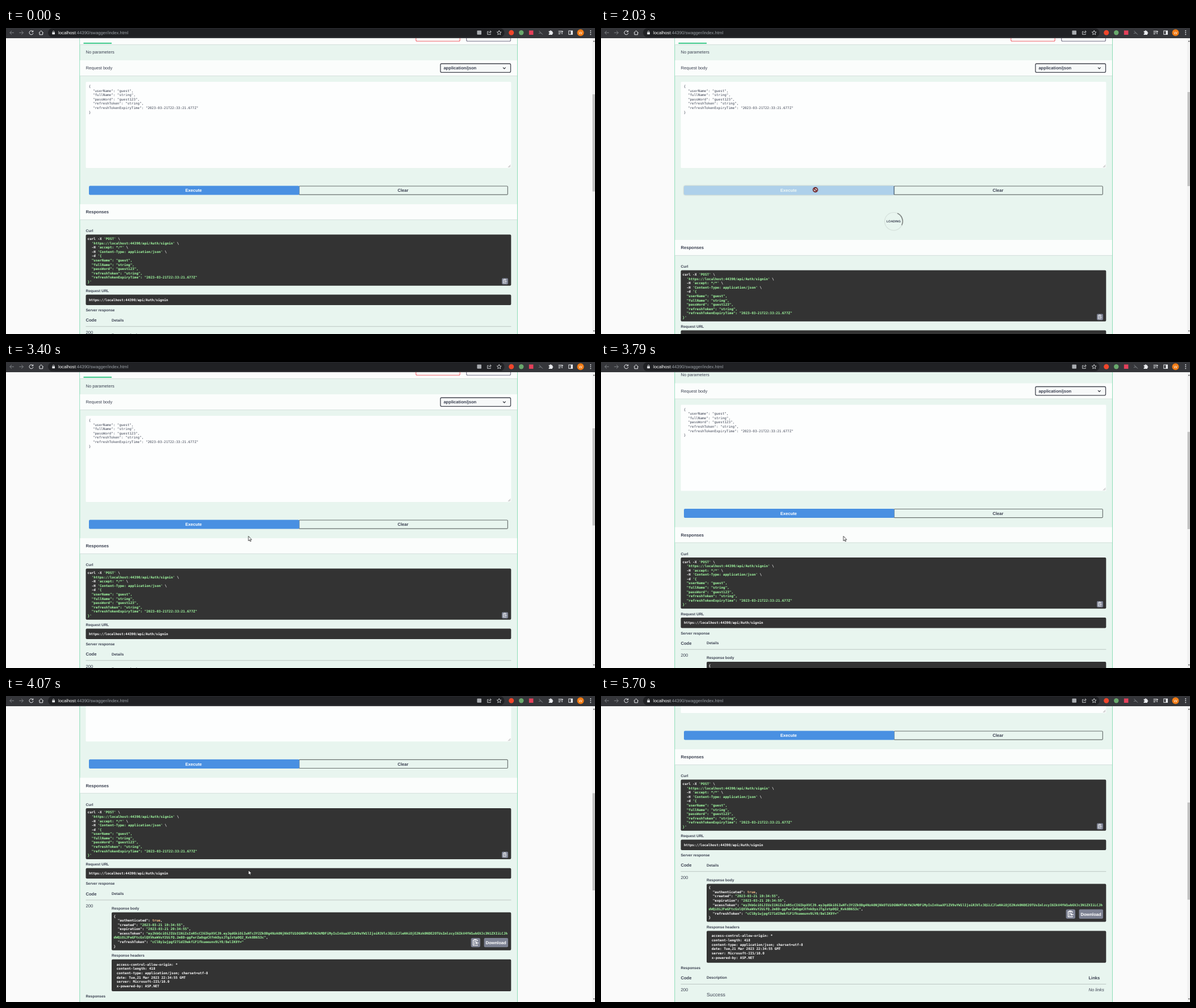
Animation of 1037x540 px, one loop 6.23 s. Source, as an HTML page:

```html
<!DOCTYPE html>
<html lang="en">
<head>
<meta charset="utf-8">
<title>API sign-in request</title>
<style>
@property --scroll { syntax: "<number>"; inherits: true; initial-value: 0; }
@property --busy { syntax: "<number>"; inherits: true; initial-value: 0; }

html, body { margin: 0; width: 100%; height: 100%; overflow: hidden; background: #fafafa; }
svg.stage {
  display: block; width: 100vw; height: 100vh;
  font: 7.6px "Liberation Sans", Arial, sans-serif;
  text-rendering: geometricPrecision;
  animation: scroll 6230ms step-end infinite, busy 6230ms step-end infinite;
}
text { fill: #3b4151; white-space: pre; }
.b { font-weight: 700; }
.s { font-weight: 700; font-size: 6.5px; }
.mid { text-anchor: middle; }
.w { fill: #fff; }
.code text { font: 5.955px "DejaVu Sans Mono", monospace; }
.code.dark text { font-weight: 700; fill: #fff; }
.code .g { fill: #a2fca2; }
.code .o { fill: #fcc28c; }
.panel { fill: #fbfdfc; }
.dark-box { fill: #333; }
.rule { stroke: #a9b3b1; stroke-width: .7; }
.edge { stroke: #cfdad6; stroke-width: .8; }
.outline { fill: none; stroke: #e8eaed; stroke-width: 1; }
.dim { stroke: #7f8286; }

.page { transform: translateY(calc(var(--scroll) * -1px)); }
.lower { transform: translateY(calc(var(--busy) * 63px)); }
.loading { opacity: var(--busy); }
.thumb {
  y: calc(117px + var(--scroll) * .327px - var(--busy) * 4px);
  height: calc(171.5px - var(--busy) * 5.5px);
}
.spin { animation: spin 6230ms steps(89) infinite; }
.execute { animation: fade 6230ms steps(4) infinite; }
.glow { filter: blur(1.3px); animation: glow 6230ms linear infinite; }
.pointer { animation: move 6230ms step-end infinite; }
.arrow { animation: arrow 6230ms step-end infinite; }
.hand { animation: hand 6230ms step-end infinite; }
.blocked { opacity: var(--busy); }

@keyframes scroll {
  0% { --scroll: 0; }
  59.65% { --scroll: 4; }
  60.75% { --scroll: 19.5; }
  61.9% { --scroll: 50; }
  63% { --scroll: 90; }
  64.1% { --scroll: 130; }
  65.25% { --scroll: 166.7; }
  66.4% { --scroll: 197; }
  67.5% { --scroll: 216.3; }
  68.45%, 100% { --scroll: 217; }
}
@keyframes busy {
  0% { --busy: 0; }
  28.2% { --busy: 1; }
  38%, 100% { --busy: 0; }
}
@keyframes spin {
  from { transform: rotate(59deg); }
  to { transform: rotate(2302deg); }
}
@keyframes fade {
  0%, 27.1% { opacity: 1; }
  31.4%, 36.9% { opacity: .36; }
  41.3%, 100% { opacity: 1; }
}
@keyframes glow {
  0%, 14% { opacity: 0; }
  18.4%, 48% { opacity: 1; }
  52%, 100% { opacity: 0; }
}
@keyframes move {
  0%, 3% { transform: translate(909px, 527px); animation-timing-function: steps(5); }
  8.5% { transform: translate(560px, 385px); animation-timing-function: steps(4); }
  12.95% { transform: translate(373px, 292px); }
  14.1% { transform: translate(375px, 289px); animation-timing-function: steps(2); }
  16.2% { transform: translate(377px, 287px); }
  18.4% { transform: translate(377px, 286.5px); animation-timing-function: steps(6); }
  25% { transform: translate(378.3px, 287px); }
  43.6% { transform: translate(378.3px, 287px); animation-timing-function: steps(9); }
  53.4% { transform: translate(423.5px, 305.5px); }
  54.5% { transform: translate(426.5px, 307px); }
  73.8% { transform: translate(426.5px, 307px); animation-timing-function: steps(10); }
  84.7% { transform: translate(867px, 495px); }
  85.8% { transform: translate(870px, 497px); animation-timing-function: steps(5); }
  91.4%, 100% { transform: translate(996px, 541px); }
}
@keyframes arrow {
  0% { opacity: 0; }
  3% { opacity: 1; }
  14.1% { opacity: 0; }
  48% { opacity: 1; }
  91.4%, 100% { opacity: 0; }
}
@keyframes hand {
  0% { opacity: 0; }
  14.1% { opacity: 1; }
  28.2% { opacity: 0; }
  38% { opacity: 1; }
  48%, 100% { opacity: 0; }
}
</style>
</head>
<body>
<svg class="stage" viewBox="0 0 1037 540">
  <defs>
    <symbol id="copy" viewBox="0 0 11 11" overflow="visible">
      <rect width="11" height="11" rx="1.8" fill="#7d8293"/>
      <path d="M7.6 4V2.6H2.6V8.8H7.6V8M4 2.6V1.9H6.2V2.6M3.8 4.4H6.4M3.8 5.8H4.8M3.8 7.2H4.8M9 6H5.8M7 4.9 5.8 6 7 7.1" fill="none" stroke="#fff" stroke-width=".8"/>
    </symbol>
  </defs>

  <g class="page">
    <rect x="129.8" y="-50" width="770.6" height="1000" fill="#e8f5ef" stroke="#7fdab0" stroke-width=".9"/>

    <rect class="panel" x="130.3" y="-20" width="769.6" height="49"/>
    <path class="edge" d="M130.3 29.4H900M130.3 84.4H900"/>
    <rect x="136.5" y="25.8" width="49.5" height="2.2" fill="#49cc90"/>
    <rect x="721.8" y="5" width="77.4" height="18.3" rx="2" fill="none" stroke="#f0646c" stroke-width="1.1"/>
    <rect x="810.7" y="5" width="77.8" height="18.3" rx="2" fill="none" stroke="#747086" stroke-width="1.1"/>
    <text x="140.5" y="44.6">No parameters</text>

    <rect class="panel" x="130.3" y="57" width="769.6" height="27"/>
    <text x="140.5" y="73.2">Request body</text>
    <rect x="764.9" y="63" width="123.6" height="15.3" rx="2" fill="#f7f9f9" stroke="#41444e" stroke-width="1.3"/>
    <text class="b" x="770.4" y="73.2">application/json</text>
    <path d="M875 69.7 877.3 72 879.6 69.7" fill="none" stroke="#23262e" stroke-width="1.1"/>

    <rect x="140.5" y="95" width="748.8" height="152" rx="1.5" fill="#fdfefe"/>
    <path d="M884 246 888.3 241.7M886.2 246 888.3 243.9" stroke="#777" stroke-width=".6"/>
    <g class="code" id="body"></g>

    <rect x="515.8" y="279" width="367.5" height="15.2" rx="1.5" fill="none" stroke="#69716f" stroke-width="1.2"/>
    <text class="b mid" x="699" y="289.3">Clear</text>
    <rect class="glow" x="146" y="278.6" width="370" height="16" rx="2" fill="#0004"/>
    <rect x="146" y="278.5" width="369.5" height="16" rx="2" fill="#e8f5ef"/>
    <path d="M515.8 279V294.2" stroke="#69716f" stroke-width="1.2"/>
    <g class="execute">
      <rect x="146" y="278.4" width="370.3" height="16.2" rx="2" fill="#4990e2"/>
      <text class="b w mid" x="330.3" y="289.3">Execute</text>
    </g>

    <g class="loading">
      <g transform="translate(515.2 341.3)" fill="none" stroke-width="1.2">
        <circle r="15.8" stroke="#555" stroke-opacity=".12"/>
        <path class="spin" d="M-11.17-11.17A15.8 15.8 0 0 1 11.17-11.17" stroke="#000" stroke-opacity=".6"/>
      </g>
      <text class="b mid" x="515.2" y="343.4" style="font-size:5.5px">LOADING</text>
    </g>

    <g class="lower">
      <rect class="panel" x="130.3" y="311" width="769.6" height="27"/>
      <path class="edge" d="M130.3 338.4H900"/>
      <text class="b" x="140.5" y="327.3">Responses</text>

      <text class="s" x="140.5" y="360.3">Curl</text>
      <rect class="dark-box" x="140.5" y="364.6" width="748.8" height="90.2" rx="2"/>
      <g class="code dark" id="curl"></g>
      <use href="#copy" x="873" y="441.4" width="11" height="11"/>

      <text class="s" x="140.5" y="466.2">Request URL</text>
      <rect class="dark-box" x="140.5" y="470.5" width="748.8" height="18.4" rx="2"/>
      <g class="code dark" id="url"></g>

      <text class="s" x="140.5" y="500.2">Server response</text>
      <text class="b" x="140.5" y="518.4">Code</text>
      <text class="s" x="186" y="517.8">Details</text>
      <path class="rule" d="M140.5 526.7H889.3"/>
      <text x="140.5" y="539.5" style="font-size:7.7px">200</text>

      <text class="s" x="186" y="543.6">Response body</text>
      <rect class="dark-box" x="186" y="548.4" width="703.3" height="67" rx="2"/>
      <g class="code dark" id="result"></g>
      <use href="#copy" x="818.6" y="593.6" width="16.4" height="16.4"/>
      <rect x="841.6" y="593.6" width="42.4" height="16.4" rx="2" fill="#7d8293"/>
      <text class="b w mid" x="862.6" y="604.5">Download</text>

      <text class="s" x="186" y="626.7">Response headers</text>
      <rect class="dark-box" x="186" y="631.4" width="703.3" height="56.3" rx="2"/>
      <g class="code dark" id="headers"></g>

      <text class="s" x="140.5" y="698.9">Responses</text>
      <text class="b" x="140.5" y="716.8">Code</text>
      <text class="s" x="186" y="716.3">Description</text>
      <text class="b" x="858.4" y="716.8">Links</text>
      <path class="rule" d="M140.5 725.5H889.3"/>
      <text x="140.5" y="738.2" style="font-size:7.7px">200</text>
      <text x="186" y="747.2" style="font-size:8.7px">Success</text>
      <text x="858.4" y="738.2" style="font-size:7.7px;font-style:italic">No links</text>
    </g>
  </g>

  <!-- scrollbar -->
  <rect x="1032" y="18" width="5" height="522" fill="#f1f1f1"/>
  <rect class="thumb" x="1032.6" width="4.4" fill="#c1c1c1"/>
  <path d="M1033.6 24.3 1035.2 22 1036.8 24.3ZM1033.6 533.8 1035.2 536.1 1036.8 533.8Z" fill="#505050"/>

  <!-- browser toolbar -->
  <rect width="1037" height="18" fill="#35363a"/>
  <rect x="74" y=".4" width="803.5" height="15.8" rx="7.9" fill="#202124"/>
  <g class="outline">
    <path class="dim" d="M14 8.3H6.8M10 5 6.7 8.3 10 11.6M23.2 8.3H30.4M27.2 5 30.5 8.3 27.2 11.6"/>
    <path d="M47.3 6.2A3.5 3.5 0 1 0 47.9 9M47.8 4.4V6.9H45.2M57.8 8.6 61.8 4.8 65.8 8.6M59 8V11.8H64.6V8"/>
    <path d="M82.3 7.6V6.3A1.4 1.4 0 0 1 85 6.3V7.6" stroke-width=".8"/>
    <path d="M849.8 6.2H847.6V11.4H853.2V9.6M849.6 9.3Q850 6.6 853.8 6.6M852 4.5 854.3 6.6 852 8.7" stroke-width=".8"/>
    <path d="M868.2 4.3 869.3 7 872.1 7.2 870 9 870.6 11.8 868.2 10.3 865.8 11.8 866.4 9 864.3 7.2 867.1 7Z" stroke-width=".8"/>
    <path class="dim" d="M938.5 5 945 11.6M938 9.8Q940 7.2 942.4 9.6"/>
    <path d="M972.6 5.6H980M972.6 8H977.4M972.6 10.4H976M979 11V6.2H981"/>
    <rect x="990.8" y="5" width="6.6" height="6.4"/>
  </g>
  <g fill="#e8eaed">
    <rect x="81.3" y="7.4" width="4.7" height="3.8" rx=".5"/>
    <rect x="829.4" y="4.4" width="7.6" height="7.4" rx="1" fill="#a9acb0"/>
    <path d="M955.6 5.6H957.6A1.3 1.3 0 0 1 960.2 5.6H962V7.4A1.3 1.3 0 0 1 962 10V12H955.6V10A1.3 1.3 0 0 0 955.6 7.4Z"/>
    <rect x="994.4" y="5" width="3" height="6.4"/>
    <circle cx="1029.3" cy="5" r=".9"/><circle cx="1029.3" cy="8.2" r=".9"/><circle cx="1029.3" cy="11.4" r=".9"/>
  </g>
  <circle cx="889.7" cy="8.2" r="4.5" fill="#f0452b"/>
  <circle cx="907.2" cy="8.2" r="4.2" fill="#68a96c"/>
  <rect x="920.8" y="4.4" width="7.6" height="7.6" fill="#e4405a"/>
  <circle cx="1011.5" cy="8.2" r="6" fill="#f07a13"/>
  <text class="w mid" x="1011.5" y="10.6" style="font-size:6.6px">W</text>
  <text x="92" y="10.9" style="font-size:7.75px;fill:#9aa0a6"><tspan fill="#fff">localhost</tspan>:44390/swagger/index.html</text>

  <g class="pointer" stroke="#000" stroke-width=".7" stroke-linejoin="round">
    <path class="arrow" fill="#fff" d="M.3.3V8.6L2.2 6.9 3.5 9.8 4.8 9.2 3.6 6.4H6Z"/>
    <path class="hand" fill="#fff" d="M-1.1 1Q0-.5 1.1 1V4.5L4.4 5.2Q5.7 5.6 5.6 6.9L5 9.9 4.4 11.7H-.4L-3 8.2Q-3.6 6.9-2.3 6.7L-1.1 7.6Z"/>
    <g class="blocked" transform="translate(-.9 -1.5)" fill="none">
      <circle r="3.7" fill="#f4e9ec" stroke="#2b1214" stroke-width="1.9"/>
      <path d="M-2.6-2.6 2.6 2.6" stroke="#2b1214" stroke-width="1.7"/>
      <circle r="3.7" stroke="#b5363a" stroke-width=".9"/>
      <path d="M-2.6-2.6 2.6 2.6" stroke="#b5363a" stroke-width=".8"/>
    </g>
  </g>
</svg>
<script>
// Text between tildes is drawn in the string colour.
function addCode(id, x, y, rows, step = 7.57) {
  document.getElementById(id).innerHTML = rows.map((row, i) => {
    const text = row
      .replace(/~(.*?)~/g, '<tspan class="g">$1</tspan>')
      .replace(/\btrue\b/, '<tspan class="o">true</tspan>');
    return `<text x="${x}" y="${y + i * step}">${text}</text>`;
  }).join('');
}

const payload = [
  '"userName": "guest",',
  '"fullName": "string",',
  '"passWord": "guest123",',
  '"refreshToken": "string",',
  '"refreshTokenExpiryTime": "2023-03-21T22:33:21.677Z"'
];
const endpoint = 'https://localhost:44390/api/Auth/signin';

addCode('body', 145.8, 105.4, ['{', ...payload.map(p => '  ' + p), '}'], 7.52);
addCode('curl', 143.6, 374.1, [
  "curl -X ~'POST'~ \\",
  `  ~'${endpoint}'~ \\`,
  "  -H ~'accept: */*'~ \\",
  "  -H ~'Content-Type: application/json'~ \\",
  "  -d ~'{~",
  ...payload.map(p => `  ~${p}~`),
  "~}'~"
]);
addCode('url', 146, 481.9, [endpoint]);
addCode('result', 189.6, 557.3, [
  '{',
  '  "authenticated": true,',
  '  "created": ~"2023-03-21 19:34:55"~,',
  '  "expiration": ~"2023-03-21 20:34:55"~,',
  '  "acessToken": ~"eyJhbGciOiJIUzI1NiIsInR5cCI6IkpXVCJ9.eyJqdGkiOiIwNTc3Y2ZkODg4NzA0NjNkOTU1OGNkMTdkYWJkMDFiMyIsInVuaXF1ZV9uYW1lIjoiR3Vlc3QiLCJleHAiOjE2Nzk0NDE2OTUsImlzcyI6IkV4YW1wbGVJc3N1ZXIiLCJh~',
  '~dWQiOiJFeGFtcGxlQXVkaWVuY2UifQ.2m8D-ggFwrZa8qpCXfnkDyzJTgJztpDQ2_Kvk8B6S3c"~,',
  '  "refreshToken": ~"cClBy1wjpgf271dI9ekfiF1fkueeunv9LY0/8elIK9Y="~',
  '}'
]);
addCode('headers', 194.8, 642.4, [
  'access-control-allow-origin: *',
  'content-length: 418',
  'content-type: application/json; charset=utf-8',
  'date: Tue,21 Mar 2023 22:34:55 GMT',
  'server: Microsoft-IIS/10.0',
  'x-powered-by: ASP.NET'
], 7.62);
</script>
</body>
</html>
```
